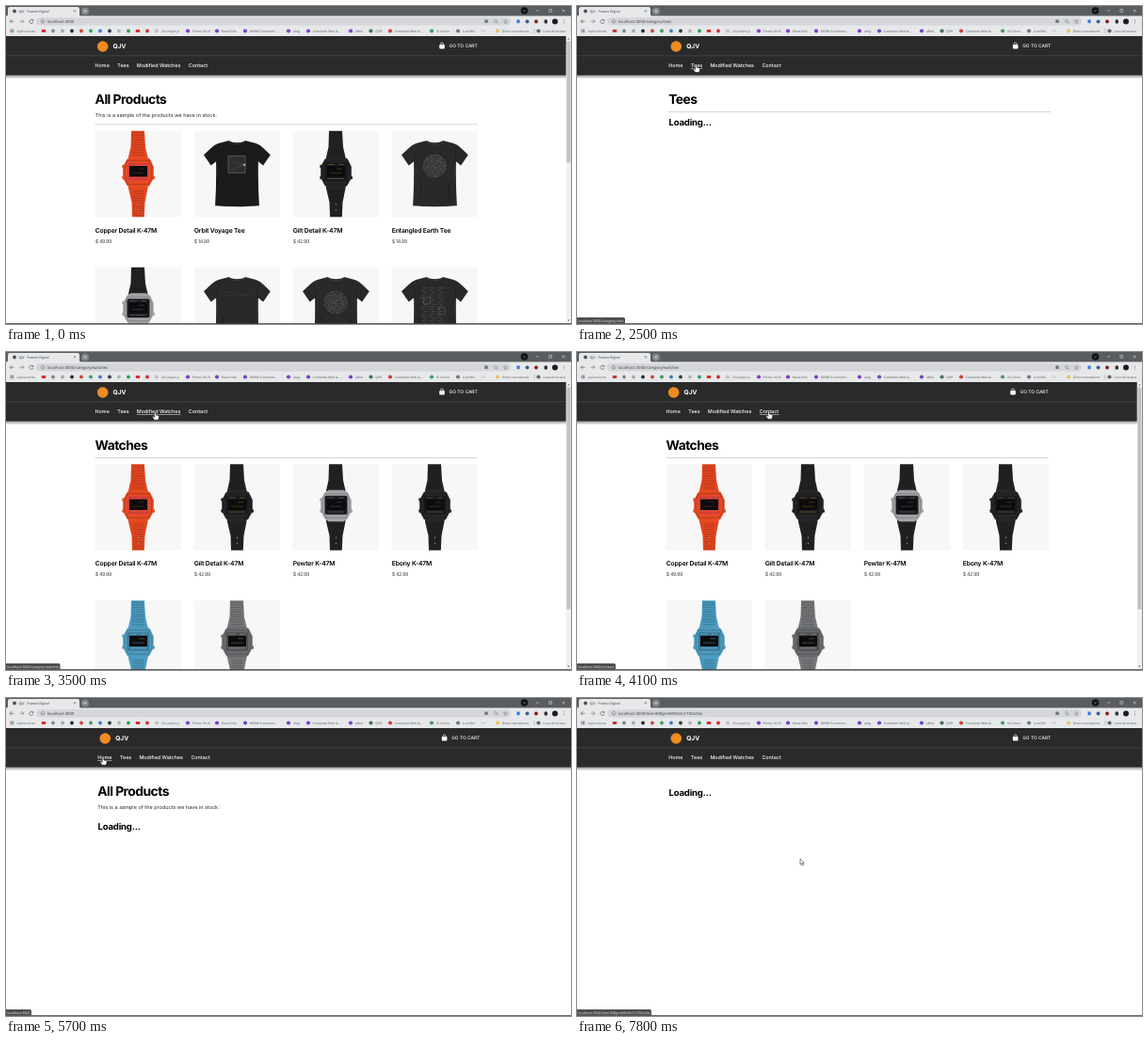
Write an HTML page that moves like this. It is 600 by 338 pixels and loops after 8 s.

```html
<!DOCTYPE html>
<html lang="es">
<head>
<meta charset="utf-8">
<title>QJV - Puesto Digital</title>
<style>
  html, body { margin: 0; width: 100%; height: 100%; overflow: hidden; background: #fff; }
  svg { display: block; width: 100%; height: 100%; }
  text { font-family: Inter, sans-serif; text-rendering: geometricPrecision; white-space: pre; }
  .ui { font: 3.4px "Open Sans", sans-serif; fill: #55585c; }
  .tab { font: 3.6px "Open Sans", sans-serif; fill: #33363a; }
  .url { font: 4.2px "Open Sans", sans-serif; fill: #3a3d41; }
  .status { font: 3.6px "Open Sans", sans-serif; fill: #e6e6e6; }
  .brand { font-size: 6.6px; font-weight: 700; fill: #fff; }
  .nav { font-size: 5.4px; font-weight: 500; fill: #fff; }
  .cart { font-size: 4.9px; font-weight: 500; fill: #fff; }
  .h1 { font-size: 13.9px; font-weight: 700; letter-spacing: -.04em; }
  .h2 { font-size: 9.6px; font-weight: 700; letter-spacing: -.02em; }
  .h3 { font-size: 6.8px; font-weight: 600; letter-spacing: -.025em; }
  .body { font-size: 5.5px; fill: #2b2b2b; }
  .price { font-size: 5.4px; letter-spacing: -.07em; fill: #444; }
</style>
</head>
<body>
<svg id="stage" viewBox="0 0 600 338" preserveAspectRatio="none"></svg>
<script>
const LOOP = 8000, STEP = 100, POINTER_IN = 300;
const HOST = 'localhost:3000', ITEM = HOST + '/item/BiBgmMNt0c61rTZk2s9al';
const TEES = HOST + '/category/tees', WATCHES = HOST + '/category/watches', CONTACT = HOST + '/contact';

const text = (x, y, cls, s) => `<text x="${x}" y="${y}" class="${cls}">${s}</text>`;
const rect = (x, y, w, h, fill, r = 0) => `<rect x="${x}" y="${y}" width="${w}" height="${h}" fill="${fill}" rx="${r}"/>`;
const dot = (x, y, r, fill) => `<circle cx="${x}" cy="${y}" r="${r}" fill="${fill}"/>`;
const line = (d, stroke, w = .5, more = '') => `<path d="${d}" fill="none" stroke="${stroke}" stroke-width="${w}" ${more}/>`;
const shape = (d, fill) => `<path d="${d}" fill="${fill}"/>`;
const move = (x, y, s, id = '') => `<g ${id && `id="${id}"`} transform="translate(${x} ${y})">${s}</g>`;
const rows = (from, to, gap, fn) => {
  let s = '';
  for (let y = from; y < to; y += gap) s += fn(y);
  return s;
};

// Product art, drawn on a 91.5 px card
function watch({ strap, body, trim, ink, speckle }) {
  let s = shape('M38.5 0H52.5L53.5 17L56 28V61L53 76L52.3 91.5H39.5L39 76L35.5 61V28L38 17Z', strap);
  s += line(rows(2, 27, 2.6, y => `M39.5 ${y}H52`) + rows(64, 91, 2.6, y => `M40.5 ${y}H51.5`), '#000', .6, 'opacity=".28"');
  if (speckle) s += line(rows(1, 91, 2.2, y => `M39 ${y}H52.5`), speckle, .6, 'stroke-dasharray="1 1.2" opacity=".7"');
  s += rect(28.8, 36, 3, 3.5, body, 1) + rect(28.8, 48, 3, 3.5, body, 1) + rect(60.5, 48, 3, 3.5, body, 1);
  s += shape('M34 30L38 27.5H54L58.5 30L62.3 38V50L58 58L54 61H38L34 58L29.7 50V38Z', body);
  s += line('M34.5 31.5H57.5L60.3 39V50L56.7 57H35.3L31.7 50V39Z', '#000', .7, 'opacity=".3"');
  if (speckle) s += line(rows(29, 60, 2, y => `M34 ${y}H58`), speckle, .6, 'stroke-dasharray="1 1.2" opacity=".6"');
  s += rect(34, 33.5, 24, 20, trim, 2) + line('M35.5 35H56.5V52H35.5Z', '#000', .5, 'opacity=".35"');
  s += line('M37 35.8H44M49 35.8H55M37 50.8H55', ink, .7, 'stroke-dasharray="1.4 .6"');
  s += rect(36.5, 37.2, 19, 11.6, '#0c0c0d', .6);
  s += line('M40 45H52M47 40.5H53', ink, 1.2, 'stroke-dasharray="1.1 .8" opacity=".5"');
  return s + dot(46, 78, .7, '#999') + dot(46, 84, .7, '#999');
}

// Sunflower spread of dots joined to their neighbours
function net(count, reach) {
  const pts = Array.from({ length: count }, (_, i) => {
    const a = i * 2.4, r = 11.8 * Math.sqrt(i / count);
    return [45.7 + r * Math.cos(a), 37.3 + r * Math.sin(a)];
  });
  let d = '';
  pts.forEach(([x, y], i) => pts.slice(i + 1).forEach(([u, v]) => {
    if (Math.hypot(x - u, y - v) < reach) d += `M${x.toFixed(1)} ${y.toFixed(1)}L${u.toFixed(1)} ${v.toFixed(1)}`;
  }));
  return line(d, '#777', .25) + pts.map(([x, y]) => dot(x.toFixed(1), y.toFixed(1), .35, '#8c8c8c')).join('')
    + '<circle cx="45.7" cy="37.3" r="12" fill="none" stroke="#6c6c6c" stroke-width=".4"/>';
}

const prints = {
  square: rect(36.5, 26.7, 18, 18, '#2c2c2d') + line('M36.5 26.7H54.5V44.7H36.5Z', '#858585', .5)
    + line([27, 30, 33, 39, 42, 45].map(y => `M36.5 ${y}L54 36`).join(''), '#5c5c5c', .25) + dot(53.8, 36, 1, '#ddd'),
  globe: net(90, 2.7),
  mesh: net(70, 3.2),
  wave: line('M32 27.5Q39 25.5 46 27.5T60 27.5M34 30H58', '#484848', .4),
  notes: line(rows(22, 62, 2.5, y => `M${31 + y % 4} ${y}H${60 - y % 5}`), '#6c6c6c', .5, 'stroke-dasharray="3 .8 1 1.4 .6 1.8"')
    + line('M34 32H41V39H34ZM50 43H57V50H50Z', '#777', .35)
};

function tee(print, cloth = '#29292b') {
  return shape('M36.5 10.5L26 13.3Q21.5 14.8 18 18.5L10.5 25.5L18.2 36.8L23.6 32.5Q24 58 22.6 79.5Q45 81.5 69.4 79.5Q68 58 68.4 32.5L73.6 36.8L81.3 25.5L74 18.5Q70.5 14.8 66 13.3L55.3 10.5Q46 14.5 36.5 10.5Z', cloth)
    + line('M36.5 10.5Q46 17.5 55.3 10.5', '#404042', .8)
    + line('M23.6 32.5Q25 27 24.5 22M68.4 32.5Q67 27 67.5 22M28 76Q33 64 30 52M63 76Q59 66 62 55', '#171718', .7) + prints[print];
}

const black = '#222224', bezel = '#1b1b1d';
const goods = {
  orange: ['Copper Detail K-47M', '49.99', watch({ strap: '#e2451f', body: '#e64a22', trim: '#e9483a', ink: '#a33a34' })],
  gold: ['Gilt Detail K-47M', '42.99', watch({ strap: black, body: '#252527', trim: bezel, ink: '#a8792f' })],
  silver: ['Pewter K-47M', '42.99', watch({ strap: black, body: '#a3a5a8', trim: bezel, ink: '#7780a8' })],
  black: ['Ebony K-47M', '42.99', watch({ strap: black, body: '#262628', trim: bezel, ink: '#66717d' })],
  blue: ['Lagoon K-47M', '49.99', watch({ strap: '#4b9cc0', body: '#519fc2', trim: '#3f86a8', ink: '#8fc4da', speckle: '#265a78' })],
  grey: ['Slate K-47M', '49.99', watch({ strap: '#77797b', body: '#6d6f72', trim: '#55575a', ink: '#a9abad', speckle: '#3f4144' })],
  space: ['Orbit Voyage Tee', '14.99', tee('square', '#1b1b1c')],
  world: ['Entangled Earth Tee', '14.99', tee('globe')],
  wave: ['Quiet Ripple Tee', '14.99', tee('wave')],
  mesh: ['Woven Sphere Tee', '14.99', tee('mesh')],
  notes: ['Chalk Notes Tee', '14.99', tee('notes')]
};

const shelf = (top, keys) => keys.split(' ').map((key, i) => {
  const [name, price, art] = goods[key];
  return move(94.5 + 105 * (i % 4), top + 145 * (i >> 2),
    rect(0, 0, 91.5, 91.5, '#f7f7f7') + art + text(.2, 108, 'h3', name) + text(.2, 119.1, 'price', '$ ' + price));
}).join('');

const title = s => text(94.6, 103.8, 'h1', s);
const rule = y => rect(94.6, y, 405.8, .6, '#b9b9b9');
const loading = y => text(94.8, y, 'h2', 'Loading...');
const intro = title('All Products') + text(94.6, 118, 'body', 'This is a sample of the products we have in stock:');

// thumb: scrollbar thumb height; pages without one sit slightly further right
const pages = {
  home: { url: HOST, top: 132.7, thumb: 129, art: intro + rule(125.6) + shelf(132.7, 'orange space gold world silver wave mesh notes') },
  homeWait: { url: HOST, art: intro + loading(140) },
  teesWait: { url: TEES, art: title('Tees') + rule(112) + loading(127) },
  tees: { url: TEES, top: 119.2, thumb: 236, art: title('Tees') + rule(112) + shelf(119.2, 'space world wave mesh notes space mesh') },
  watchesWait: { url: WATCHES, art: title('Watches') + rule(112) + loading(127) },
  watches: { url: WATCHES, top: 119.2, thumb: 236, art: title('Watches') + rule(112) + shelf(119.2, 'orange gold silver black blue grey') },
  contact: { url: CONTACT, art: title('Contact') + text(94.6, 124, 'body', '4718 W. Maplerun Place') + text(94.6, 138.3, 'body', 'Durwick, ZQ 00471') },
  item: { url: ITEM, art: loading(103.8) }
};
const links = [['Home', 94.6, 15.4], ['Tees', 118.3, 12.4], ['Modified Watches', 138.8, 46.8], ['Contact', 193.8, 20.8]];

function browser() {
  let s = rect(0, 0, 600, 11, '#5a5d60') + rect(0, 10.5, 600, 21.5, '#e6e8ea');
  s += shape('M0 11Q2 11 2 9V3Q2 1 4 1H76Q78 1 78 3V9Q78 11 80 11Z', '#e6e8ea');
  s += dot(9, 5.5, 1.9, '#4b4f54') + text(13.6, 6.8, 'tab', 'QJV - Puesto Digital');
  s += line('M71.8 4.2L74 6.4M74 4.2L71.8 6.4', '#444') + dot(84, 5.4, 4, '#84878a') + line('M82.2 5.4H85.8M84 3.6V7.2', '#eee');
  s += dot(550.5, 5, 3.8, '#111213') + line('M549.2 4.5L550.5 5.8L551.8 4.5', '#ddd');
  s += line('M563 5H566M576.8 3.5H579.6V6.3H576.8ZM590.6 3.5L593.6 6.5M593.6 3.5L590.6 6.5', '#eee');
  s += rect(32, 12.3, 504, 8.2, '#d4d6d9', 4.1);
  s += line('M8.5 16.3H4.2M6.2 14.2L4.1 16.3L6.2 18.4M28.7 15.2A2.1 2.1 0 1 0 29 17M29 14V15.7H27.3', '#4b4e52', .6);
  s += line('M14.5 16.3H18.8M16.8 14.2L18.9 16.3L16.8 18.4', '#6a6d70', .6);
  s += line('M39 14.4A1.9 1.9 0 1 0 39.1 14.4M39 16V17.4', '#55585c', .5);
  s += rect(508.3, 14.6, 3.4, 3.4, '#70757a', .5) + line('M520 14.6A1.5 1.5 0 1 0 520.1 14.6M521.2 17.2L522.4 18.4', '#5f6368');
  s += line('M530.5 14.3L531.1 15.8L532.6 15.9L531.4 16.9L531.8 18.4L530.5 17.6L529.2 18.4L529.6 16.9L528.4 15.9L529.9 15.8Z', '#5f6368', .4);
  s += rect(542.4, 14.6, 3.2, 3.6, '#3a7bd5', .5) + dot(553.5, 16.4, 2, '#3f5f94') + dot(563, 16.4, 2, '#8f1d22');
  s += rect(571.6, 15, 3.4, 3.4, '#303236', .6) + dot(573.3, 14.8, .8, '#303236') + dot(583, 16.4, 3, '#1b1d20');
  s += [14.8, 16.4, 18].map(y => dot(592.3, y, .45, '#444')).join('');
  // bookmarks
  s += [0, 1, 2].map(i => rect(4.5 + 1.4 * i, 24.6, .9, 3.7, ['#d9534a', '#4e9a5c', '#4c7fd1'][i])).join('') + text(11.6, 27.8, 'ui', 'Aplicaciones');
  const marks = ['#d32f2f', '#80868b', '#a5a9ad', '#292b2e', '#c9473c', '#3b9d58', '#4179cf', '#303a44', '#b2b5b8', '#25a35a', '#d32f2f', '#d32f2f'];
  s += marks.map((c, i) => i % 10 ? dot(40 + 10 * i, 26.5, 1.9, c) : rect(37.8 + 10 * i, 25, 4.4, 3.1, c, .6)).join('');
  const violet = '#7b3fd0';
  s += [[160, '#bfc2c5', '20 project js'], [193, violet, 'Plomo UIUX'], [224, violet, 'React Nilo'], [254, violet, 'MERN Ecommerc...'],
    [300, violet, 'ulvig'], [321, violet, 'Complete Web &amp;...'], [366, violet, 'aBrul'], [387.5, '#47705b', 'QVR'],
    [408, '#c8453b', 'Complete Web &amp;...'], [452, '#4a9b68', 'UI Colors'], [480, '#777b80', 'Lum384'], [522, '#e9c461', 'Otros marcadores'],
    [565.5, '#62666a', 'Lista de lectura']].map(([x, c, s]) => dot(x, 26.5, 2.1, c) + text(x + 4.8, 27.8, 'ui', s)).join('');
  return s + line('M505 25.4L506.1 26.5L505 27.6M507 25.4L508.1 26.5L507 27.6M561 24V29', '#777', .4);
}

function header() {
  const nav = links.map(([s, x, w]) => text(x, 65.4, 'nav', s) + `<rect class="under" x="${x}" y="66.2" width="${w}" height=".5" fill="#fff"/>`).join('');
  return dot(102.7, 43, 5.8, '#ee8b22') + text(113.6, 45.4, 'brand', 'QJV')
    + rect(460.2, 40.9, 5.6, 4.5, '#fff', .8) + line('M461.6 41V40.4A1.4 1.4 0 0 1 464.4 40.4V41', '#fff', .7)
    + text(470.6, 44.3, 'cart', 'GO TO CART') + nav;
}

const stage = document.getElementById('stage');
stage.innerHTML = `<defs><linearGradient id="shade" x2="0" y2="1"><stop stop-color="#000" stop-opacity=".4"/><stop offset="1" stop-color="#000" stop-opacity="0"/></linearGradient></defs>`
  + rect(0, 0, 600, 338, '#fff')
  + Object.entries(pages).map(([key, p]) => move(p.thumb ? 0 : 2.6, 0, p.art, key)).join('')
  + rect(0, 73.6, 600, 4, 'url(#shade)') + rect(0, 32, 600, 41.7, '#2a2a2a') + rect(0, 52.6, 600, .6, '#505050')
  + move(0, 0, header(), 'header')
  + `<g id="scroll">${rect(594.7, 32, 5.3, 306, '#f1f1f1')}<rect id="thumb" x="595.4" y="37.5" width="4" fill="#c1c1c1"/>`
  + shape('M596 35.5L597.4 34L598.8 35.5ZM596 333.5L597.4 335L598.8 333.5Z', '#666') + '</g>'
  + browser() + text(44, 17.8, 'url', '<tspan id="url"></tspan>')
  + rect(0, 337.2, 600, .8, '#444')
  + `<g id="status"><path id="plate" fill="#4d4e50"/><text id="hint" x="1.2" y="335.7" class="status"></text></g>`
  + '<g id="pointer">'
  + `<path id="arrow" d="M0 0V6L1.4 4.8L2.3 6.9L3.3 6.5L2.4 4.4H4.2Z" fill="#fff" stroke="#111" stroke-width=".5"/>`
  + `<path id="hand" d="M-.8 .6Q0 -.5 .8 .6V3.4L3.6 4.2Q4.3 4.6 4 6L3.2 8.7H-1L-3 5.6Q-3 4.5 -1.8 5L-.8 6Z" fill="#fff" stroke="#111" stroke-width=".5"/></g>`;

const el = id => document.getElementById(id);
const show = (node, on) => node.style.display = on ? '' : 'none';
const unders = [...stage.querySelectorAll('.under')];

const visits = [[0, 'home'], [2500, 'teesWait'], [2800, 'tees'], [3200, 'watchesWait'], [3500, 'watches'],
  [4300, 'contact'], [5700, 'homeWait'], [6000, 'home'], [7700, 'item']];
// time, address, plate width
const hints = [[0, '', 0], [1700, ITEM, 79], [2000, '', 0], [2200, TEES, 51], [3000, WATCHES, 57.5], [4000, CONTACT, 41],
  [5500, HOST, 27], [6400, TEES, 51], [7300, ITEM, 79]];
const path = [[0, 72, 227], [POINTER_IN, 72, 227], [1100, 197.5, 171.5], [1500, 242.5, 171.5], [1700, 242.5, 171.5], [2200, 126.5, 61.8],
  [2700, 126.5, 61.8], [3100, 158.5, 63.5], [3500, 158.5, 63.5], [4100, 203.7, 62.5], [5100, 203.7, 62.5], [5500, 103, 62.5],
  [5900, 103, 62.5], [6500, 121.5, 61], [6600, 121.5, 61], [7300, 237, 171], [LOOP, 237, 171]];

const current = (table, t) => table.filter(row => row[0] <= t).pop();
function pointerAt(t) {
  const i = path.findIndex(p => p[0] > t), [t0, x0, y0] = path[i - 1], [t1, x1, y1] = path[i];
  const k = (t - t0) / (t1 - t0);
  return [x0 + (x1 - x0) * k, y0 + (y1 - y0) * k];
}

function draw(t) {
  const key = current(visits, t)[1], page = pages[key], shift = page.thumb ? 0 : 2.6;
  for (const id in pages) show(el(id), id === key);
  el('header').setAttribute('transform', `translate(${shift} 0)`);
  show(el('scroll'), page.thumb);
  if (page.thumb) el('thumb').setAttribute('height', page.thumb);
  el('url').textContent = page.url;

  const [, hint, width] = current(hints, t);
  show(el('status'), hint);
  el('hint').textContent = hint;
  el('plate').setAttribute('d', `M0 331H${width - 1.5}Q${width} 331 ${width} 332.5V337.4H0Z`);

  const [x, y] = pointerAt(t);
  const link = links.findIndex(([, left, w]) => y > 57 && y < 69 && x >= left + shift && x <= left + w + shift);
  unders.forEach((u, i) => show(u, i === link));
  const onCard = page.thumb && x > 94.5 && (x - 94.5) % 105 < 91.5 && y > page.top && y < page.top + 91.5;
  const isHand = link >= 0 || onCard;
  show(el('pointer'), t >= POINTER_IN);
  show(el('hand'), isHand);
  show(el('arrow'), !isHand);
  el('pointer').setAttribute('transform', `translate(${x.toFixed(2)} ${y.toFixed(2)})`);
}

const start = performance.now();
function tick() {
  const t = (performance.now() - start) % LOOP;
  draw(Math.floor(t / STEP) * STEP);
  requestAnimationFrame(tick);
}
tick();
</script>
</body>
</html>
```
